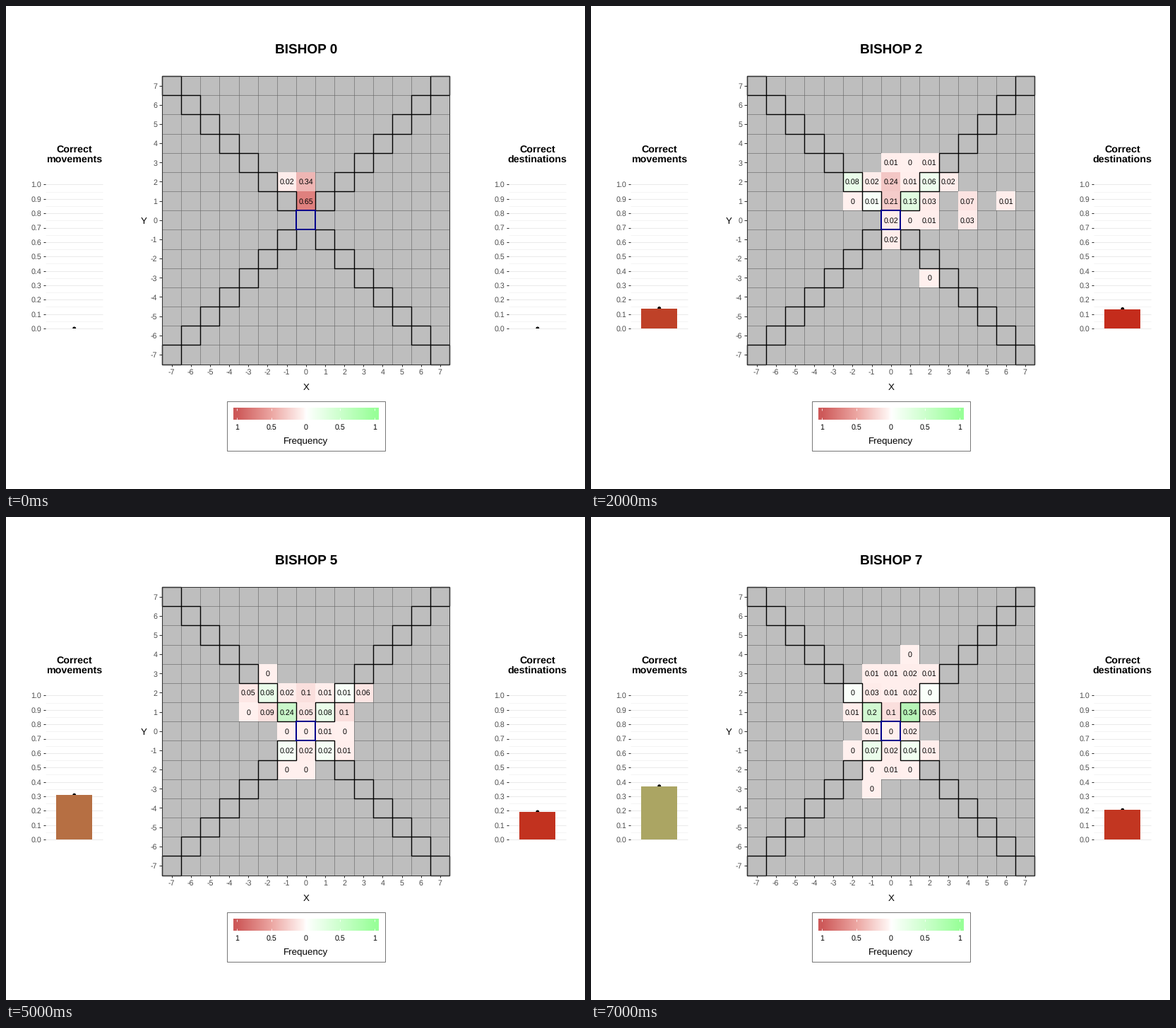
Animation, 820 px wide and 683 px high, one loop 8 s. Source, as a matplotlib script:

```python
import matplotlib.pyplot as plt
import numpy as np
from matplotlib.animation import FuncAnimation
from matplotlib.patches import Circle, Rectangle

W, H, DPI = 820, 683, 100
CELL = 27.17
CX, CY = 424.7, 302.8          # centre of the board
HALF = 7.5 * CELL
BAR_TOP, BAR_BASE = 252.5, 456
INK, AXIS = "#333333", "#4D4D4D"

# Each step: rows of "y x0: values in hundredths", "-" is an empty cell.
STEPS = [
    "2 -1: 2 34; 1 0: 65",
    "3 0: 3; 2 -1: 3 31 2 0; 1 -1: 4 42 10 3; -1 0: 2",
    "3 0: 1 0 1; 2 -2: 8 2 24 1 6 2; 1 -2: 0 1 21 13 3 - 7 - 1;"
    "0 0: 2 0 1 - 3; -1 0: 2; -3 2: 0",
    "4 -2: 1 - - 0 - - 7; 3 -2: 2 3 0 0 0; 2 -2: 1 0 30 2 0;"
    "1 -2: 8 14 7 20 1; 0 -2: 0 0 - 1; -1 -1: 0 - 0 1; -2 0: 0",
    "3 -2: 0; 2 -3: 6 12 3 2 1 0; 1 -3: 1 8 42 4 1 14;"
    "0 -1: 0 0 0 0 - 0; -1 -1: 1 2 0 0; -2 -1: 0 0; -4 -1: 0",
    "3 -2: 0; 2 -3: 5 8 2 10 1 1 6; 1 -3: 0 9 24 5 8 10;"
    "0 -1: 0 0 1 0; -1 -1: 2 2 2 1; -2 -1: 0 0",
    "4 -2: 0; 3 -4: 0 0 0 - - - - 0; 2 -4: 4 2 3 1 12 1 0 9;"
    "1 -4: 0 0 9 20 2 18 3; 0 -2: 1 0 1 1 0; -1 -2: 0 2 2 3 1;"
    "-2 -2: 0 0 0 0; -3 1: 0; -4 1: 0",
    "4 1: 0; 3 -1: 1 1 2 1; 2 -2: 0 3 1 2 0; 1 -2: 1 20 10 34 5;"
    "0 -1: 1 0 2; -1 -2: 0 7 2 4 1; -2 -1: 0 1 0; -3 -1: 0",
]


def parse(step):
    cells = {}
    for row in step.split(";"):
        head, values = row.split(":")
        y, x0 = map(int, head.split())
        for i, v in enumerate(values.split()):
            if v != "-":
                cells[x0 + i, y] = int(v) / 100
    return cells


def on_diagonal(x, y):
    return abs(x) == abs(y) and x != 0


BOARDS = [parse(s) for s in STEPS]
MOVES = [sum(v for p, v in b.items() if on_diagonal(*p)) for b in BOARDS]
GOALS = [0, .2, .205, .275, .245, .225, .25, .24]

plt.rcParams["font.family"] = "Liberation Sans"
plt.rcParams["text.hinting"] = "none"
# The small surplus keeps the pixel size from being rounded down.
fig = plt.figure(figsize=((W + .01) / DPI, (H + .01) / DPI), dpi=DPI,
                 facecolor="white")
ax = fig.add_axes([0, 0, 1, 1])


def pt(px):
    return px * 72 / DPI


def text(x, y, s, size=10.67, color="black", ha="center", weight="normal"):
    """Place text with its capitals centred on y."""
    return ax.text(x, y + 0.355 * size, s, fontsize=pt(size), color=color,
                   ha=ha, va="baseline", weight=weight, zorder=6)


def line(x0, y0, x1, y1, color, width, z=1):
    ax.plot([x0, x1], [y0, y1], color=color, lw=pt(width), zorder=z,
            solid_capstyle="butt")


def box(x, y, w, h, face="none", edge="none", width=0, z=1):
    return ax.add_patch(Rectangle((x, y), w, h, facecolor=face, edgecolor=edge,
                                  lw=pt(width), zorder=z, joinstyle="miter"))


def cell(x, y, **style):
    return box(CX + (x - .5) * CELL, CY - (y + .5) * CELL, CELL, CELL, **style)


def rgb(r, g, b):
    return tuple(np.clip([r, g, b], 0, 255) / 255)


def tile_color(x, y, v):
    if on_diagonal(x, y):
        return rgb(250 - 200 * v, 255 - 35 * v, 250 - 200 * v)
    return rgb(255 - 50 * v, 240 - 172 * v, 238 - 172 * v)


def bar_color(v):
    return rgb(207 - 56 * v, 270 * v - 11, 160 * v - 5)


def draw_board():
    left, right = CX - HALF, CX + HALF
    top, bottom = CY - HALF, CY + HALF
    box(left, top, 2 * HALF, 2 * HALF, face="#BEBEBE", z=0)
    for k in range(-7, 8):
        x, y = CX + k * CELL, CY - k * CELL
        if k < 7:
            line(x + CELL / 2, top, x + CELL / 2, bottom, "#666666", .6)
            line(left, y - CELL / 2, right, y - CELL / 2, "#666666", .6)
        line(x, bottom, x, bottom + 3.7, INK, 1.07)
        line(left - 3.7, y, left, y, INK, 1.07)
        text(x, 517.5, str(k), color=AXIS)
        text(left - 6.5, y + .5, str(k), color=AXIS, ha="right")
        if k:
            cell(k, k, edge="black", width=1.4, z=3)
            cell(k, -k, edge="black", width=1.4, z=3)
    cell(0, 0, edge="#00008B", width=2, z=4)
    box(left, top, 2 * HALF, 2 * HALF, edge=INK, width=1.07, z=4)
    text(CX, 538.5, "X", 13.33)
    text(195.5, 303, "Y", 13.33)


def draw_scale(cx, word):
    text(cx, 201.5, "Correct", 14.2, weight="bold")
    text(cx, 216.2, word, 14.2, weight="bold")
    for i in range(21):
        y = BAR_BASE - i / 20 * (BAR_BASE - BAR_TOP)
        major = i % 2 == 0
        line(cx - 40.5, y, cx + 40.5, y, "#EBEBEB", 1.07 if major else .55)
        if major:
            line(cx - 44.2, y, cx - 40.5, y, INK, 1.07)
            text(cx - 46.8, y, f"{i / 20:.1f}", color=AXIS, ha="right")


def draw_legend():
    box(312.5, 559, 224, 70.5, face="white", edge="#555555", width=.8)
    s = np.linspace(-1.05, 1.05, 410)
    stops = [-1, -.5, -.04, 0, 1]
    channels = [(205, 236, 255, 255, 152), (88, 166, 245, 255, 255),
                (88, 162, 243, 255, 152)]
    ramp = np.stack([np.interp(s, stops, c) / 255 for c in channels], axis=-1)
    ax.imshow(ramp[None], extent=(322, 527, 585, 569), aspect="auto", zorder=2)
    for i in range(-2, 3):
        x = CX + i * 48.65
        line(x, 569, x, 572.2, "white", .8, 3)
        line(x, 581.8, x, 585, "white", .8, 3)
        text(x, 595.5, f"{abs(i) / 2:g}")
    text(424.5, 615, "Frequency", 13.33)


def draw_bar(cx, rates, n):
    mean = sum(rates[:n + 1]) / (n + 1)
    height = mean * (BAR_BASE - BAR_TOP)
    dot = ax.add_patch(Circle((cx, BAR_BASE - height), 2.5, color="black",
                              lw=0, zorder=2))
    dot.set_clip_path(panel_clip)
    return [dot, box(cx - 25.6, BAR_BASE - height, 51.2, height,
                     face=bar_color(rates[n]), z=3)]


draw_board()
draw_scale(96.7, "movements")
draw_scale(752.8, "destinations")
draw_legend()
title = text(425, 60.5, "", 19, weight="bold")
panel_clip = box(0, 0, W, BAR_BASE + .5)
ax.set(xlim=(0, W), ylim=(H, 0))
ax.axis("off")
shown = []


def update(n):
    while shown:
        shown.pop().remove()
    title.set_text(f"BISHOP {n}")
    for (x, y), v in BOARDS[n].items():
        shown.append(cell(x, y, face=tile_color(x, y, v), z=2))
        shown.append(text(CX + x * CELL, CY - y * CELL, f"{v:g}"))
    shown.extend(draw_bar(96.7, MOVES, n))
    shown.extend(draw_bar(752.8, GOALS, n))
    return shown


anim = FuncAnimation(fig, update, frames=len(BOARDS), interval=1000,
                     repeat=True, repeat_delay=0, blit=False)
plt.show()
```
